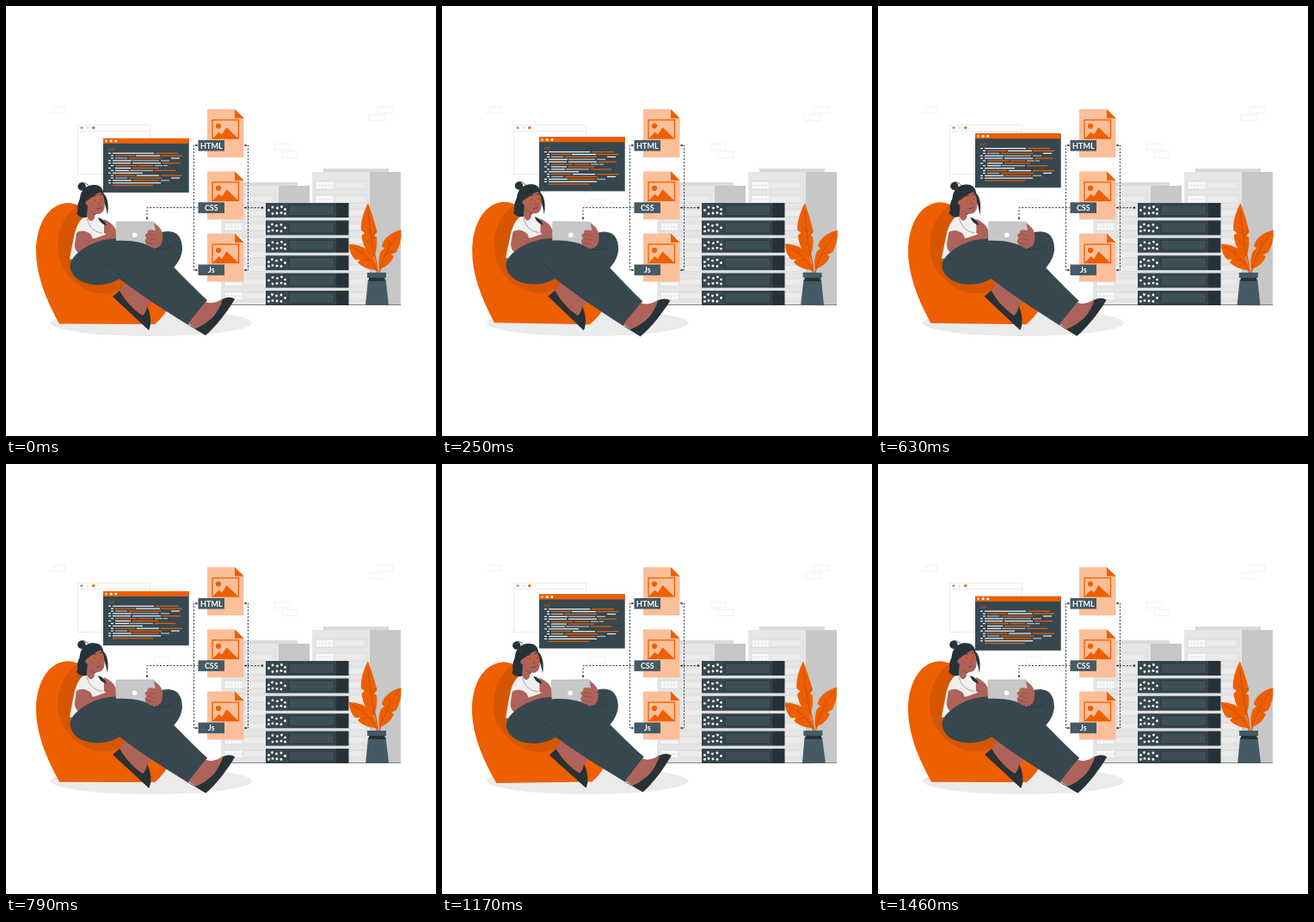
Recreate the animation shown at these times as an HTML page with a canvas. Size 500 px wide and 500 px high, loop 1500 ms.

```html
<!DOCTYPE html>
<html lang="en">
<head>
<meta charset="utf-8">
<title>Working from the beanbag</title>
<style>
html, body { margin: 0; width: 100%; height: 100%; overflow: hidden; background: #fff; }
canvas { display: block; width: 100vw; height: 100vh; }
</style>
</head>
<body>
<canvas id="stage"></canvas>
<script>
const canvas = document.getElementById('stage');
const ctx = canvas.getContext('2d');
const LOOP = 1500;
const ORANGE = '#ee5f00', RUST = '#d65600', SLATE = '#37474f', STEEL = '#455a64',
      INK = '#263238', SKIN = '#ad6359', SHADE = '#8f4c43',
      PALE = '#ebebeb', GREY = '#c7c7c7', WHITE = '#fff';

function rect(color, x, y, w, h) {
  ctx.fillStyle = color;
  ctx.fillRect(x, y, w, h);
}
function frame(color, x, y, w, h, width = 1) {
  ctx.strokeStyle = color;
  ctx.lineWidth = width;
  ctx.strokeRect(x, y, w, h);
}
function dot(color, x, y, rx, ry = rx) {
  ctx.fillStyle = color;
  ctx.beginPath();
  ctx.ellipse(x, y, rx, ry, 0, 0, Math.PI * 2);
  ctx.fill();
}
function shape(color, d) {
  ctx.fillStyle = color;
  ctx.fill(new Path2D(d));
}
function line(color, d, width = 0.7) {
  ctx.strokeStyle = color;
  ctx.lineWidth = width;
  ctx.stroke(new Path2D(d));
}
function rotated(x, y, angle, draw) {
  ctx.save();
  ctx.translate(x, y);
  ctx.rotate(angle);
  ctx.translate(-x, -y);
  draw();
  ctx.restore();
}

function drawBricks() {
  const bricks = [[55.5, 117.5, 13], [432, 117.5, 18], [422, 126.5, 18], [312, 160.5, 18],
                  [321, 169.5, 18], [172, 224.5, 18], [183, 233.5, 18]];
  for (const [x, y, w] of bricks) frame('#f3f3f3', x, y, w, 7);
  line('#f3f3f3', 'M50 124.5H56', 1);
}

function drawBackWindow() {
  frame('#ebebeb', 83.5, 138.5, 84, 57);
  line('#ebebeb', 'M83 145.5H168', 1);
  dot('#a6a6a6', 88, 141.6, 1.7);
  dot('#e4e4e4', 95, 141.6, 1.7);
  dot(ORANGE, 101.7, 141.6, 1.7);
}

function drawPaleServer(x, y, firstRow) {
  rect('#dadada', x + 13, y - 4, 76, 4);
  rect('#e6e6e6', x, y, 67, 347 - y);
  rect(GREY, x + 67, y, 36, 347 - y);
  for (let row = firstRow; row < 342; row += 16.1) {
    rect('#ececec', x + 3, row, 61, 11);
    frame('#d6d6d6', x + 3.5, row + 0.5, 60, 10, 0.7);
    frame('#dadada', x + 26, row + 2, 35, 7, 0.7);
    for (let i = 0; i < 10; i++) {
      dot(WHITE, x + 6.5 + (i % 5) * 3.9, row + 3.5 + Math.floor(i / 5) * 4.2, 1.4);
    }
  }
}

const LIGHTS = [[310, 5], [315.5, 6], [320.5, 4.5], [324.5, 7.5], [305.5, 8.5],
                [310, 12.5], [315, 12], [320, 11.5], [324.5, 12.5]];

function drawRack() {
  rect('#e0e0e0', 302, 230, 96.5, 117);
  for (let i = 0; i < 6; i++) {
    const y = 229 + i * 20.4;
    rect(SLATE, 302, y, 82, 17);
    rect(INK, 384, y, 14.5, 17);
    frame(INK, 329, y + 2.5, 53, 12, 0.6);
    for (let s = 3.8; s < 14; s += 2.2) rect('#4a5e68', 330, y + s, 51, 0.7);
    for (const [x, dy] of LIGHTS) dot(WHITE, i % 2 ? 630 - x : x, y + dy, 1.4);
  }
}

function drawCard(y, label) {
  ctx.save();
  ctx.translate(0, y);
  shape('#fbbf99', 'M234 0H266L276.5 10.5V56H234Z');
  shape(ORANGE, 'M266 0L276.5 10.5H266Z');
  frame(ORANGE, 240, 12.5, 30.5, 21.5, 1.3);
  dot(ORANGE, 247, 19.5, 3.1);
  shape(ORANGE, 'M240.5 34L247.5 26.5L251 29.5L256.5 21L270 34Z');
  rect(STEEL, 223.5, 36, 30.5, 12.6);
  ctx.fillStyle = WHITE;
  ctx.font = 'bold 9px Lato, sans-serif';
  ctx.textAlign = 'center';
  ctx.textBaseline = 'alphabetic';
  ctx.fillText(label, 238.8, 45.5);
  ctx.restore();
}

function drawLinks() {
  ctx.setLineDash([2.2, 1.7]);
  line(INK, 'M164 247V234.5H223M223 162H218.5V307H223M277 162H281.5V307H277M277 234.5H298', 0.9);
  ctx.setLineDash([]);
  for (const y of [162, 307]) {
    dot(INK, 221, y, 1.1);
    dot(INK, 279, y, 1.1);
  }
  dot(INK, 164, 247, 1.1);
  dot(INK, 279, 234.5, 1.1);
  dot(INK, 298, 234.5, 1.2);
}

// Each row lists colour, start and end of its runs: w white, o orange, g grey.
const CODE = [
  'w119-122 w124-172 o174-200', 'w122-125 o127-150 w151-179 o180-205',
  'w122-125 g127-141 o143-180 w192-202', 'w119-122 w124-146 g147-178 g180-190',
  'w119-122 w124-145 w147-180 o182-203', 'w122-125 o127-152 o154-171 g173-182 g183-188',
  'w119-122 w127-145 o147-177', 'w122-125 w127-143 g144-171 o173-197',
  'w119-122 w124-159', 'w122-125 o127-150 w152-178 o180-205',
  'w122-125 g127-141 o143-181 w192-202', 'w119-122 w124-146 o147-178 g180-190',
  'w119-122 w124-180', 'o124-171'
].map(row => row.split(' ').map(run => [run[0], ...run.slice(1).split('-').map(Number)]));
const INKS = { w: '#f5f5f5', o: ORANGE, g: '#b4bbbf' };

function drawCodeWindow(y) {
  ctx.save();
  ctx.translate(0, y);
  rect(SLATE, 113, 0, 99.7, 63);
  rect(ORANGE, 113, 0, 99.7, 6);
  dot('#fbbf99', 116.5, 3, 1.5);
  dot(WHITE, 122.2, 3, 1.5);
  dot(WHITE, 127.8, 3, 1.5);
  line(ORANGE, 'M119 14L120.5 11.5M122 14L123.3 11.5M124 14L125.3 11.5', 0.8);
  CODE.forEach((runs, i) => {
    for (const [ink, from, to] of runs) rect(INKS[ink], from, 16.7 + i * 2.88, to - from, 1.2);
  });
  ctx.restore();
}

function drawBeanbag() {
  shape(ORANGE, 'M62 369.500C46 341 35 312 35 286C35 257 47 231 71 229C82 229 90 234 98 243L150 300L205 325C194 340 188 358 173 370Z');
  shape(RUST, 'M84 232C68 242 59 261 60.500 285C62 306 77 321 94 330C112 338 130 334 140 325L110 270Z');
}

function drawFarLeg() {
  shape(SLATE, 'M128 272L181 263C198 259 205 268 205 283C204 297 193 307 185 314L150 326L128 316Z');
  shape(SKIN, 'M140 319L132 331L146 349L161 362L164 350L169 343Z');
  shape(INK, 'M124 338L132 331C139 343 148 353 159 360C162 357 164 352 164 349C168 356 170 370 166 377Z');
}

function drawBody() {
  shape('#f0f0f0', 'M94 244C87 246 82 254 79 268L74 294L90 297L126 274L128 262L117 249L106 244Z');
  shape(SKIN, 'M94 243C95 250 100 253 103 246L102 240Z');
  shape(SKIN, 'M114 248C121 251 127 256 128 262L126 271L114 264Z');
  shape(INK, 'M107 246C112 247 115 250 117 255C112 254 109 251 107 246Z');
  shape(SKIN, 'M82 264C86 260 94 261 99 266L101 271L129 261V273L94 287C85 291 79 285 80 276Z');
  line(SHADE, 'M96 275L103 270', 0.6);
  line(INK, 'M94 247C97 258 103 263 112 264', 0.4);
}

function drawHead() {
  shape(INK, 'M86 223C87 213 95 207.500 103 208C109 208 113 212 113.500 218C118 222 120 232 118 243C117 237 116 232 114 228L99 240L94 245.500C89 247 84 245 82 241C85 239 82 234 84 229C85 226 86 225 86 223Z');
  dot(INK, 88.2, 210, 4.7);
  line(INK, 'M84 211C85 205 91 203 96 209', 0.8);
  shape(SKIN, 'M95 231L94 244C97 249 102 248 103 243Z');
  shape(SHADE, 'M98 238L103 244L106 241Z');
  shape(SKIN, 'M95 226C99 223 105 218 110 216.500C114 219 115.500 229 114.500 235C113 242 106 244 101 240C98 238 96 235 95 232C91 231 92 226 95 226Z');
  line(ORANGE, 'M96 226L100 226M100 224.500C103 222 106 223 106 226C106 230 101 231 100 227ZM106 225L108 224.500M108 224C110 221 113 221 113.500 224C113.500 228 109 229 108 226Z', 0.8);
  line(INK, 'M101 221.500L105 220.500M109 219.500L112 219.200M103 226H104M110.500 225H111.500', 0.9);
  line(SHADE, 'M107.500 227L109 231L107 231.500', 0.7);
  line('#6f332c', 'M105 236C108 236 110 235 111 234', 0.9);
}

function drawNearLeg() {
  shape(SLATE, 'M75 299C78 289 94 277 112 272.500C133 268 156 270 172 282C191 298 213 323 234 342L212 371C183 353 153 334 132 317C119 326 99 326 87 320C78 315 73 307 75 299Z');
  line(INK, 'M116 299C126 307 132 313 139 320M173 282C180 284 187 283 193 279', 0.6);
  shape(SKIN, 'M212 369L232 344C239 347 247 344 252 340L255 345L225 378Z');
  shape(INK, 'M212 371C214 371 217 373 220 375C235 370 248 356 252 341C256 338 263 338 266 341C257 356 244 373 232 383Z');
}

function drawLaptop() {
  shape(GREY, 'M130 251H171C174 251 175 253 175 256L173 282C161 275 146 272 128 273L127.500 254C127.500 252 128 251 130 251Z');
  line('#a6a6a6', 'M128 251H172', 0.6);
  dot(WHITE, 149.5, 266.2, 2.8);
  shape(SKIN, 'M172 253C176 254 181 259 182 265C183 273 181 279 176 281C170 282 164 279 162 275C161 272 162 271 164 270C161 268 161 265 165 264C163 261 167 259 174 261Z');
  line(SHADE, 'M164 265L174 267M164 270L175 272M163 275L174 277', 0.7);
}

function drawWoman() {
  drawBeanbag();
  drawFarLeg();
  drawBody();
  drawHead();
  drawNearLeg();
  drawLaptop();
}

function drawPlant() {
  line(ORANGE, 'M427 282C430 293 432 302 432 312M434 310C436 301 442 288 447 281M432 310C429 302 422 294 414 288', 1.7);
  shape(ORANGE, 'M421 229C416 239 412 251 413 261L417 264L413.500 267C415 279 420 287 427 293C431 286 432 278 431 269L428 267L431.500 263C429 252 425 240 421 229Z');
  shape(ORANGE, 'M459.500 260C449 263 439 269 437 279L440 282L436 285C433 292 433 300 434 306C441 304 448 299 451 291L448 289L454 286C457 280 459 274 459.500 268Z');
  shape(ORANGE, 'M399 277C409 277 421 281 426 290C429 296 431 302 431 307C422 307 413 303 409 298L412 295L406 295C401 290 399 283 399 277Z');
  line('#9c3e00', 'M421 238C423 258 426 279 429 295M457 264C447 276 439 291 435 306M402 280C414 286 425 296 431 307', 0.5);
  line('#9c3e00', 'M424 263L418 256M425 270L431 260M426 279L419 272M446 279L445 272M441 289L450 285M415 288L414 283M422 295L415 296', 0.4);
  shape(STEEL, 'M421 318H441.500L445 348H418Z');
  rect(INK, 422, 315.5, 18.5, 4.5);
  rect(STEEL, 420, 310, 22, 6);
}

function render(now) {
  const phase = (now % LOOP) / LOOP * Math.PI * 2;
  const sway = Math.sin(phase) * Math.PI / 180;
  ctx.setTransform(canvas.width / 500, 0, 0, canvas.height / 500, 0, 0);
  rect(WHITE, 0, 0, 500, 500);
  drawBricks();
  drawBackWindow();
  dot(PALE, 169, 368.5, 117, 15.5);
  drawPaleServer(356, 193, 203);
  drawPaleServer(250, 209, 219);
  drawRack();
  line(INK, 'M250 347.500H459', 0.6);
  ['HTML', 'CSS', 'Js'].forEach((label, i) => drawCard(120 + i * 72.3, label));
  drawLinks();
  drawCodeWindow(150.9 + 3 * Math.cos(phase));
  rotated(151, 294, sway, drawWoman);
  rotated(429, 289, sway, drawPlant);
}

function resize() {
  const density = window.devicePixelRatio || 1;
  canvas.width = Math.round(innerWidth * density);
  canvas.height = Math.round(innerHeight * density);
}

function tick() {
  render(performance.now());
  requestAnimationFrame(tick);
}

addEventListener('resize', resize);
resize();
tick();
</script>
</body>
</html>
```
